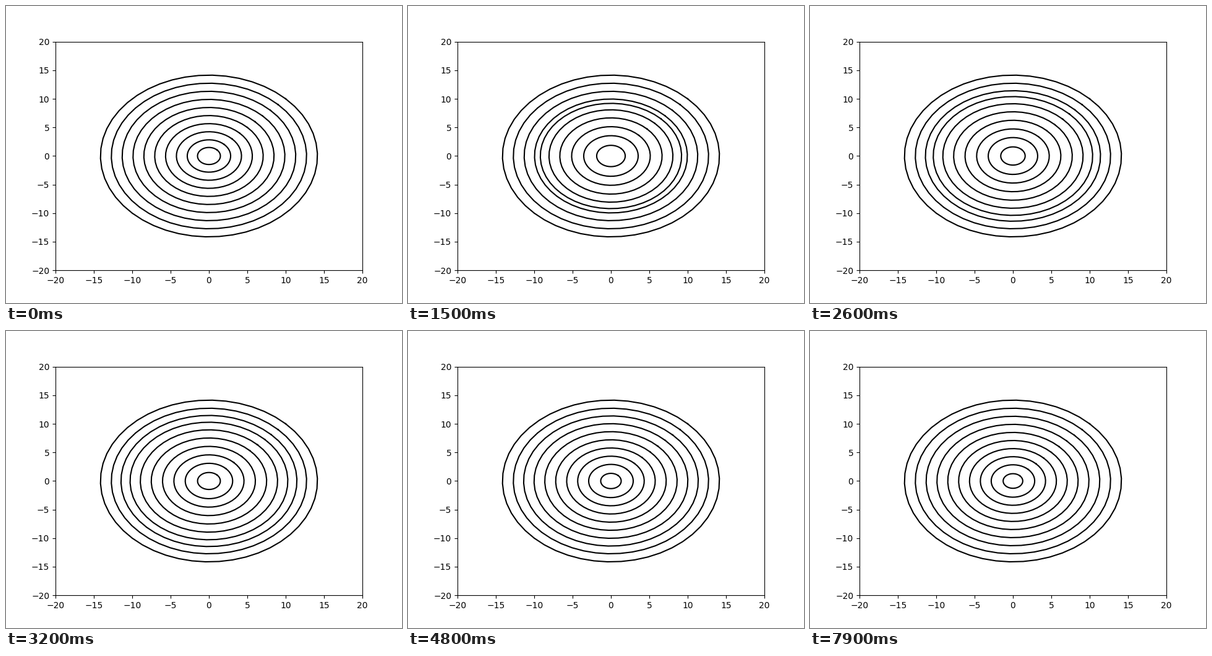
Write a matplotlib script that moves like this. It is 640 px wide and 480 px high and loops after 8000 ms.

```python
import numpy as np
import matplotlib.pyplot as plt
from matplotlib.animation import FuncAnimation

FRAMES = 80
INTERVAL = 100
INDEX = np.arange(1, 11)
HOME = np.where(INDEX == 1, 0.9, INDEX)
STRENGTH = np.hypot(0.85, 0.4 * INDEX)

# Each ring is the point (r, r) turned once around the centre.
theta = np.linspace(0, 2 * np.pi, 51)
ring_x = np.cos(theta) - np.sin(theta)
ring_y = np.sin(theta) + np.cos(theta)


def radii(n):
    """Ring sizes as a pulse runs outward, slows down and fades."""
    front = 8.8 - 7.3 * np.exp(-n / 10.4)
    fade = 1 / (1 + np.exp(0.085 * (n - 12.5)))
    reach = np.tanh(0.45 * np.maximum(front - INDEX, 0))
    return HOME + STRENGTH * fade * reach


fig, ax = plt.subplots(figsize=(6.4, 4.8), dpi=100)
ax.set_xlim(-20, 20)
ax.set_ylim(-20, 20)
lines = [ax.plot([], [], color="black", lw=1.5)[0] for _ in INDEX]


def update(n):
    for line, r in zip(lines, radii(n)):
        line.set_data(r * ring_x, r * ring_y)
    return lines


anim = FuncAnimation(fig, update, frames=FRAMES, interval=INTERVAL,
                     repeat=True, repeat_delay=0)
plt.show()
```
